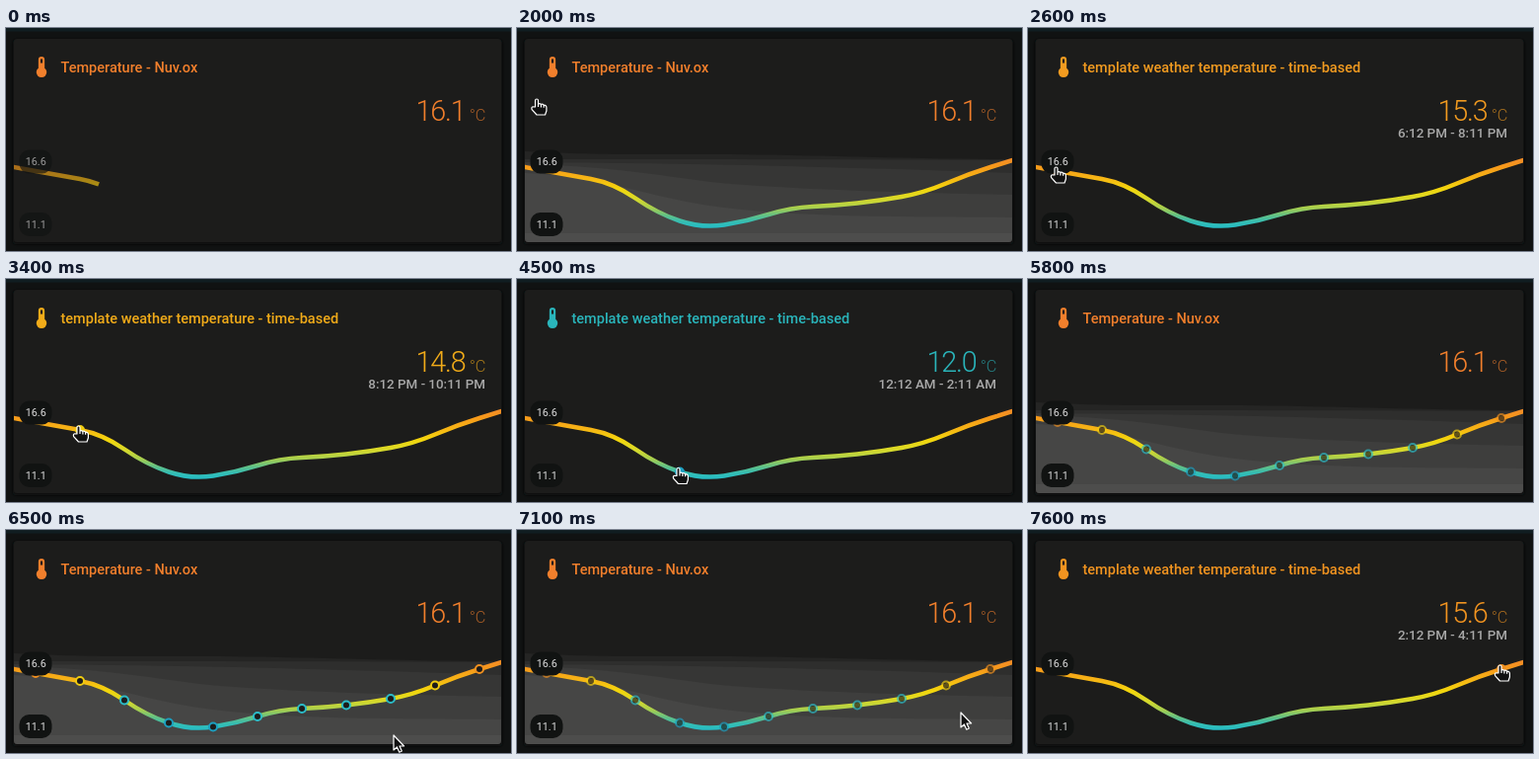
Write an HTML page that moves like this. It is 512x226 px and loops after 8000 ms.

```html
<!DOCTYPE html>
<html lang="en">
<head>
<meta charset="utf-8">
<style>
  html, body { margin: 0; width: 100%; height: 100%; overflow: hidden; background: #101212; }
  svg { display: block; font-family: Roboto, sans-serif; }
  .end { text-anchor: end; }
  #title { font-size: 14.5px; font-weight: 500; }
  #value { font-size: 28.8px; font-weight: 300; letter-spacing: -1.2px; }
  #unit { font-size: 16.4px; font-weight: 300; opacity: .65; }
  #span { font-size: 13.4px; font-weight: 500; fill: #a9a9a9; }
  .label rect { fill: #111312; }
  .label text { font-size: 10.8px; fill: #dedede; text-anchor: middle; }
  .cursor { fill: #111; stroke: #fff; stroke-width: 1.2; stroke-linejoin: round; }
</style>
</head>
<body>
<svg width="512" height="226" viewBox="0 0 512 226">
  <defs>
    <linearGradient id="heat" gradientUnits="userSpaceOnUse" x1="0" y1="130" x2="0" y2="202">
      <stop offset="0" stop-color="#f0862b"/>
      <stop offset=".15" stop-color="#f79a1a"/>
      <stop offset=".32" stop-color="#f6b814"/>
      <stop offset=".46" stop-color="#f3d60c"/>
      <stop offset=".6" stop-color="#d8d92a"/>
      <stop offset=".73" stop-color="#a5ce50"/>
      <stop offset=".83" stop-color="#64c184"/>
      <stop offset=".92" stop-color="#36bdb2"/>
      <stop offset="1" stop-color="#26bcc4"/>
    </linearGradient>
    <filter id="soft" x="-20%" y="-20%" width="140%" height="140%"><feGaussianBlur stdDeviation="1.5"/></filter>
    <clipPath id="clip"><rect x="8" y="11" width="494" height="206" rx="3"/></clipPath>
  </defs>
  <rect width="512" height="3.5" fill="#101d21"/>
  <rect x="7" y="12" width="496" height="207" rx="3" fill="#0a0b0b" filter="url(#soft)"/>
  <rect x="8" y="11" width="494" height="206" rx="3" fill="#1c1c1b"/>

  <g clip-path="url(#clip)">
    <g id="area" fill="#fff" fill-opacity=".041"></g>
    <path id="line" fill="none" stroke="url(#heat)" stroke-width="4.5" pathLength="1"/>
  </g>
  <g id="dots" stroke-width="2"></g>
  <g id="labels" class="label">
    <rect x="13.5" y="123.5" width="33" height="24" rx="10"/><text x="30.2" y="139.3">16.6</text>
    <rect x="13.5" y="187" width="33" height="24" rx="10"/><text x="30.2" y="202.6">11.1</text>
  </g>

  <g id="tinted">
    <path transform="translate(23.4 27) scale(1.05)" d="M15 13V5A3 3 0 0 0 9 5V13A5 5 0 1 0 15 13M12 4A1 1 0 0 1 13 5V8H11V5A1 1 0 0 1 12 4Z"/>
    <text id="title" x="55.5" y="45"></text>
    <text id="value" class="end" x="465.5" y="94"></text>
    <text id="unit" class="end" x="486.5" y="94">°C</text>
  </g>
  <text id="span" class="end" x="486" y="111"></text>

  <path id="hand" class="cursor" d="M-2 8V1.5Q-2 0 -.5 0T1 1.5V5Q2.6 4.2 3.8 5.4Q5.4 4.8 6.5 6.2Q9.4 6 9.4 8.5V12L8 16H-.5L-5.4 10.6Q-6.2 8.4-4.4 7.8ZM1 5V8M3.9 5.6V8.4M6.6 6.4V8.8"/>
  <path id="arrow" class="cursor" d="M0 0V15L3.4 12L5.8 17.2L8.3 16L6 11H10.6Z"/>
</svg>
<script>
const $ = id => document.getElementById(id);
const NS = "http://www.w3.org/2000/svg";
const add = (parent, tag, attrs) => {
  const el = document.createElementNS(NS, tag);
  for (const k in attrs) el.setAttribute(k, attrs[k]);
  return parent.appendChild(el);
};
const clamp = v => Math.max(0, Math.min(1, v));

// Points lie midway between the control points, which makes the quadratics smooth.
const ctrl = [141, 149, 157, 188, 203, 196, 182, 180, 175, 167, 148, 134];
const pts = ctrl.slice(1).map((y, i) => [30 + 45 * i, (y + ctrl[i]) / 2]);
$("line").setAttribute("d", `M7.5 ${ctrl[0]}L${pts[0]}` +
  pts.slice(1).map((p, i) => `Q${52.5 + 45 * i} ${ctrl[i + 1]} ${p}`).join("") + `L502.5 ${ctrl[11]}`);

// Upper edges of the stacked grey areas
[
  "8 125C90 129 120 128 200 128S400 133 502 133",
  "8 133C150 133 350 133 502 134",
  "8 136C120 137 250 138 502 147",
  "8 138C120 141 160 154 230 159S400 167 502 169",
  "8 147C100 152 130 172 210 182S400 191 502 192",
  "8 208L502 208"
].forEach(top => add($("area"), "path", { d: `M${top}V218H8Z` }));

const ring = i => i == 0 || i == 10 ? "#f0901f" : i == 1 || i == 9 ? "#f0cc10" :
  i == 3 || i == 4 ? "#1c9fc0" : "#2bbcc8";
const dots = pts.map(([cx, cy], i) => add($("dots"), "circle", { cx, cy, r: 4, stroke: ring(i) }));

// start: pointer leaves a point; hover: it reaches the next; lead: head start of the dots' fade
const moves = [
  { start: 2000, hover: 2500, i: 0, from: [20.5, 72], lead: 0, value: "15.3", color: "#f29b20" },
  { start: 3100, hover: 3400, i: 1, from: [44, 160], lead: 170, value: "14.8", color: "#f1ab19" },
  { start: 4000, hover: 4400, i: 3, from: [100, 207], lead: 170, value: "12.0", color: "#2ab5bb" },
  { start: 4900, hover: 5400, i: 5, from: [200, 208], lead: 170, value: "12.4", color: "#4cba9c" },
  { start: 5800, hover: 6200, i: 7, from: [290, 207], lead: 170, value: "13.2", color: "#a5ce50", late: true },
  { start: 6500, hover: 6900, i: 9, from: [393, 208], lead: 300, value: "14.5", color: "#f3c413" },
  { start: 7100, hover: 7500, i: 10, from: [450, 185], lead: 170, value: "15.6", color: "#f29420" }
];

const clock = (hour, min) => `${hour % 12 || 12}:${min} ${hour % 24 < 12 ? "AM" : "PM"}`;
const show = (el, on) => el.setAttribute("visibility", on ? "visible" : "hidden");

function draw(t) {
  const drawn = 1 - (1 - clamp((t + 118) / 1000)) ** 1.5;
  $("line").setAttribute("stroke-dasharray", `${drawn} 2`);
  for (const id of ["line", "labels"]) $(id).setAttribute("opacity", .65 + .35 * clamp(t / 600));

  const move = moves.filter(m => m.start <= t).pop();
  const hover = move && t >= move.hover;
  show($("area"), move && !hover);

  const fade = move ? clamp((t - move.start + move.lead) / 250) : 0;
  dots.forEach((dot, i) => {
    const active = hover && i == move.i;
    dot.setAttribute("opacity", hover ? +active : fade);
    dot.setAttribute("fill", active ? ring(i) : "#1c1c1b");
  });

  $("tinted").setAttribute("fill", hover ? move.color : "#f17f2c");
  $("title").textContent = hover ? "template weather temperature - time-based" : "Temperature - Nuv.ox";
  $("value").textContent = hover ? move.value : "16.1";
  const hour = hover ? 18 + 2 * move.i : 0;
  $("span").textContent = hover ? `${clock(hour, 12)} - ${clock(hour + 2, 11)}` : "";

  const pointing = move && (hover || move.i == 0);
  show($("hand"), pointing);
  show($("arrow"), move && !pointing && !(move.late && t < move.start + 100));
  if (move) {
    const u = clamp((t - move.start) / (move.hover - move.start));
    const k = u * u * (3 - 2 * u);
    const [x, y] = pts[move.i];
    const [x0, y0] = move.from;
    const at = `translate(${x0 + (x - 1 - x0) * k} ${y0 + (y - 4 - y0) * k})`;
    $("hand").setAttribute("transform", at);
    $("arrow").setAttribute("transform", at);
  }
}

const begin = performance.now();
function tick() {
  // The picture advances in steps of 100 ms.
  draw(Math.floor((performance.now() - begin) % 8000 / 100) * 100);
  requestAnimationFrame(tick);
}
tick();
</script>
</body>
</html>
```
